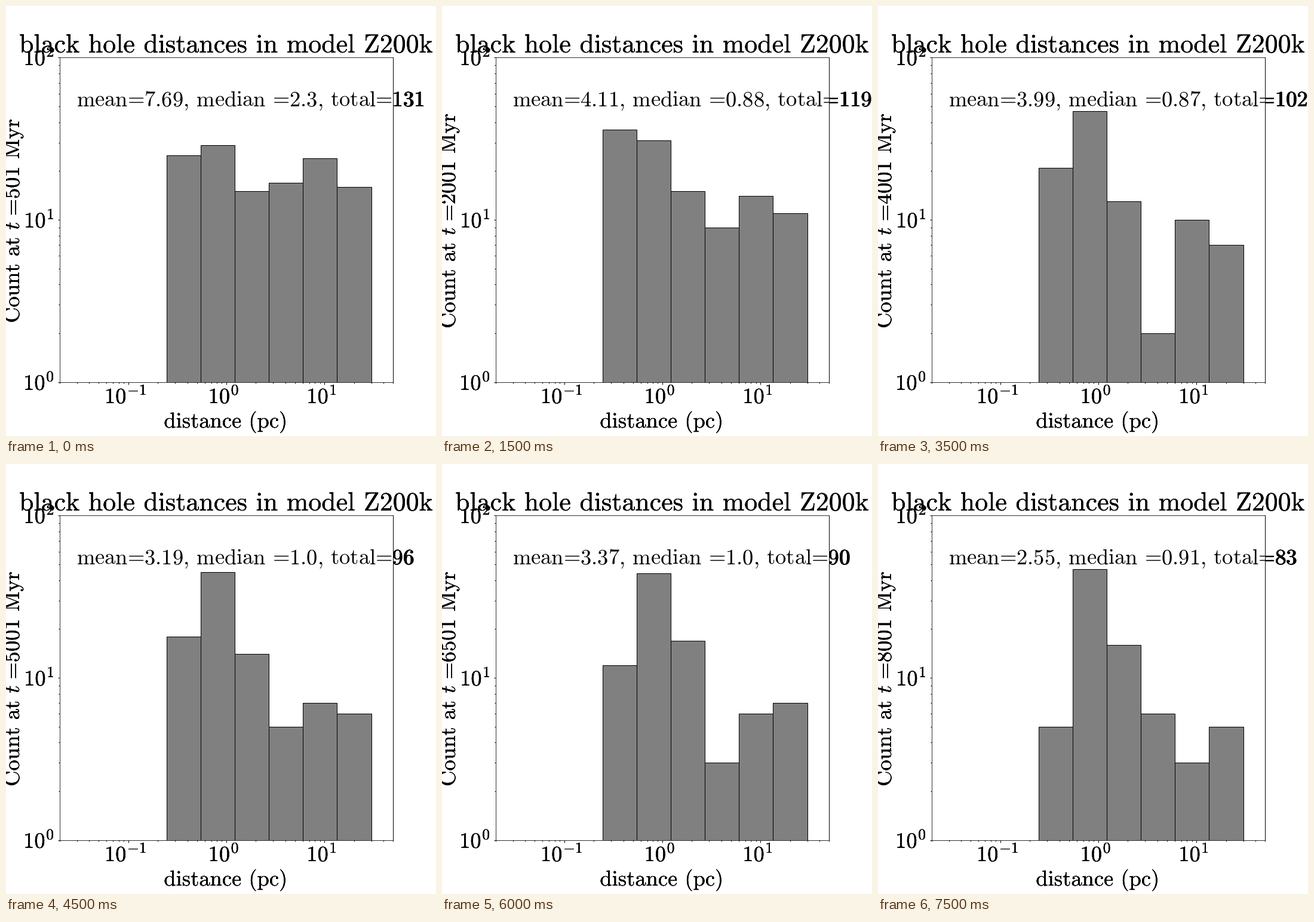
Animation of 720x720 px, one loop 8 s. Source, as a matplotlib script:

```python
import numpy as np
import matplotlib.pyplot as plt
from matplotlib.animation import FuncAnimation
from matplotlib.patheffects import Normal
from matplotlib.transforms import Bbox

plt.rcParams.update({"mathtext.fontset": "cm", "text.hinting": "none"})

SIZE, FRAMES = 720, 16
TITLE_PT, TEXT_PT = 43.9, 36.5
HEAVY = [Normal()] * 3  # repeated passes darken the antialiased edges
EDGES = np.geomspace(0.01, 30, 11)[4:]

# step: six bar counts, then mean, median and total
KEYS = {
    0: (25, 29, 15, 17, 24, 16, 7.69, 2.3, 131),
    3: (36, 31, 15, 9, 14, 11, 4.11, 0.88, 119),
    5: (27, 39, 16, 6, 11, 7, 3.8, 0.92, 108),
    7: (21, 47, 13, 2, 10, 7, 3.99, 0.87, 102),
    10: (16, 44, 15, 6, 5, 5, 2.79, 1.06, 93),
    12: (12, 44, 17, 3, 6, 7, 3.37, 1.0, 90),
    15: (5, 47, 16, 6, 3, 5, 2.55, 0.91, 83),
}


def state(i):
    """Counts and statistics at step i, between the key steps."""
    return [float(np.interp(i, list(KEYS), col)) for col in zip(*KEYS.values())]


def roman(s):
    """Set a string upright with plain text spacing."""
    s = s.replace(",", "{,}").replace("=", r"\hspace{-0.2}=\hspace{-0.2}")
    return r"$\mathrm{" + s.replace(" ", r"\hspace{0.38}") + "}$"


def time_label(i):
    start = r"\mathrm{Count\hspace{0.38}at\hspace{0.38}}"
    equals = r"t\hspace{0.116}=\hspace{-0.2}"
    end = r"\mathrm{%d\hspace{0.38}Myr}" % (501 + 500 * i)
    return f"${start}{equals}{end}$"


def stats_label(mean, median, total):
    return roman(f"mean={round(mean, 2)}, median ={round(median, 2)}, "
                 f"total={round(total)}")


def put(x, y, s="", size=TEXT_PT, ha="center", **kw):
    """Place text by its baseline, in pixels from the top left."""
    return fig.text(x / SIZE, 1 - y / SIZE, s, fontsize=size, ha=ha,
                    va="baseline", **kw)


fig = plt.figure(figsize=(10, 10), dpi=72, facecolor="white")
ax = fig.add_axes([0.125, 0.125, 0.775, 0.755])
bars = ax.bar(EDGES[:-1], np.ones(6), width=np.diff(EDGES), align="edge",
              color="gray", edgecolor="black", linewidth=1)
ax.set(xscale="log", yscale="log", xlim=(0.02, 50), ylim=(1, 100))
ax.tick_params(which="both", width=1, labelleft=False, labelbottom=False)
ax.spines["right"].set_linewidth(1)

put(369, 78, roman("black hole distances in model Z200k"), TITLE_PT,
    path_effects=HEAVY)
put(367, 706, roman("distance (pc)"), path_effects=HEAVY)
for p in (-1, 0, 1):
    x = ax.transData.transform((10.0 ** p, 1))[0]
    put(x - 4.5, 665, f"$10^{{{p}}}$", path_effects=HEAVY)
for p in (0, 1, 2):
    y = SIZE - ax.transData.transform((1, 10.0 ** p))[1]
    put(81, y + 12.5, f"$10^{p}$", ha="right", path_effects=HEAVY)

clock = put(22, 359.5, rotation=90, rotation_mode="anchor", path_effects=HEAVY)
stats = [put(117.5, 168, ha="left"),
         put(117.5, 168, ha="left", path_effects=HEAVY)]
# the heavier copy shows only right of the axes
stats[1].set_clip_box(Bbox([[648, 0], [SIZE, SIZE]]))
stats[1].set_clip_on(True)


def update(i):
    now = state(i)
    for bar, n in zip(bars, now[:6]):
        bar.set_height(round(n))
    clock.set_text(time_label(i))
    for t in stats:
        t.set_text(stats_label(*now[6:]))
    return [*bars, clock, *stats]


anim = FuncAnimation(fig, update, frames=FRAMES, interval=500, repeat=True)
plt.show()
```
